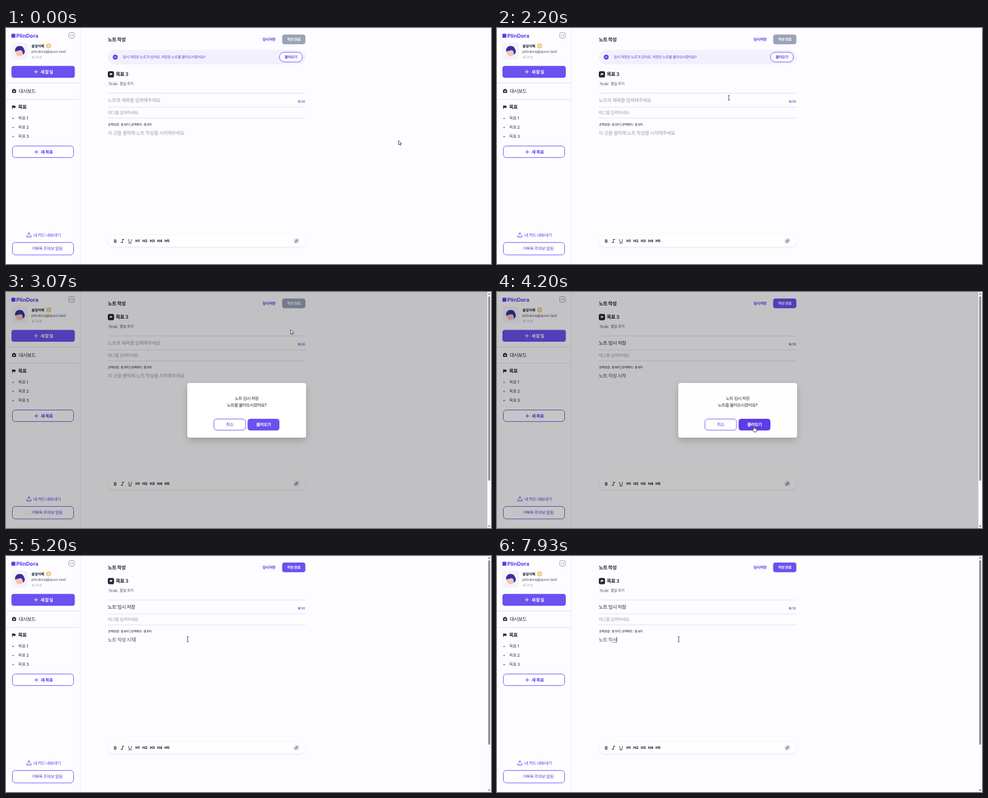
An HTML page that plays this animation: 800x389 px, repeating every 8 s.

```html
<!DOCTYPE html>
<html lang="ko">
<head>
<meta charset="utf-8">
<title>노트 작성</title>
<style>
html, body { margin: 0; width: 100%; height: 100%; overflow: hidden; background: #fdfcff; }
svg { display: block; width: 100vw; height: 100vh; }
text {
  font-family: Inter, "Noto Sans CJK KR", "Noto Sans CJK", sans-serif;
  letter-spacing: -.06em; white-space: pre; text-rendering: geometricPrecision;
}
.latin { letter-spacing: 0; }
</style>
</head>
<body>
<svg id="stage" viewBox="0 0 800 389"></svg>
<script>
const LOOP = 8000;
const PURPLE = '#6c50f0', DEEP = '#5a3de8', INK = '#1e2433', SLATE = '#475063', MUTED = '#98a1b3', RULE = '#e3e4ec';
const SHIFT = -35;               // the banner's height, lost once it is dismissed
const OPEN = 2790, SAVED = 4190, CLOSE = 4195, FADE = 150;

const text = (x, y, size, str, fill = INK, weight = 400, extra = '') =>
  `<text x="${x}" y="${y}" font-size="${size}" fill="${fill}" font-weight="${weight}" ${extra}>${str}</text>`;
const rect = (x, y, w, h, rx, fill, extra = '') =>
  `<rect x="${x}" y="${y}" width="${w}" height="${h}" rx="${rx}" fill="${fill}" ${extra}/>`;
const outlined = (x, y, w, h, rx) => rect(x, y, w, h, rx, '#fff', `stroke="${PURPLE}" stroke-width=".9"`);
const line = (d, color, width = 1, extra = '') =>
  `<path d="${d}" fill="none" stroke="${color}" stroke-width="${width}" ${extra}/>`;
const shape = (d, fill, extra = '') => `<path d="${d}" fill="${fill}" ${extra}/>`;
const circle = (x, y, r, fill, extra = '') => `<circle cx="${x}" cy="${y}" r="${r}" fill="${fill}" ${extra}/>`;
const plus = (x, y, color) => line(`M${x - 3.2} ${y}h6.4M${x} ${y - 3.2}v6.4`, color, .9);
const flag = (x, y, s, fill) =>
  shape('M-2.6-3h.8v.4q1.400-.5 2.500 0t2.200 0v3.500q-1.100.5-2.200 0t-2.500 0v2.300h-.8z', fill,
    `transform="translate(${x} ${y}) scale(${s})"`);
const CENTER = 'text-anchor="middle"';

const sidebar = () => [
  line('M122.500 0V389', '#ebebf2'),
  rect(9, 9.500, 6.500, 6.500, .8, DEEP),
  text(17, 16, 8.8, 'PlinDora', DEEP, 700, 'class="latin"'),
  rect(103.500, 7.500, 9.300, 9.300, 2.600, '#fff', 'stroke="#8a91a3" stroke-width=".8"'),
  line('M107.800 10.200l-1.900 1.900 1.900 1.900M110.800 10.200l-1.900 1.900 1.900 1.900', '#6c7385', .7),
  rect(9, 24, 27, 28, 4, '#f5f4fb'),
  circle(22.500, 40, 6.600, '#f5c3bb'),
  shape('M14.800 39Q14.500 29.500 23 29.500Q30.500 30 31 40Q29.500 44 27.800 43.500Q28 38.500 25 36.500Q19 37 14.800 39z', '#382f9f'),
  text(42, 31.500, 6, '솔잎식혜', INK, 600),
  circle(70.300, 29.500, 4, '#edc277'),
  circle(70.300, 29.500, 2.400, '#f6dfa8'),
  text(42, 40.700, 6.200, 'plindora@quvo.test', SLATE, 400, 'class="latin"'),
  text(42, 49.700, 5, '로그아웃', MUTED),
  rect(9, 62.500, 104.500, 19.500, 4, PURPLE),
  plus(49.300, 72.200, '#fff'),
  text(57, 74.800, 7, '새 할 일', '#fff', 700),
  line('M0 90.500H122M0 117.500H122', RULE),
  rect(10, 101.500, 6.600, 5.600, 1.400, INK),
  rect(11.700, 100.400, 3.200, 2, .8, INK),
  circle(13.300, 104.200, 1.300, '#fff'),
  text(21, 106.800, 8, '대시보드', INK, 500),
  flag(12.700, 130.500, 1, INK),
  text(20, 133.300, 8, '목표', INK, 600),
  ...[1, 2, 3].map(n => {
    const y = 136.300 + 15 * n;
    return circle(11.700, y - 2.300, 1, SLATE) + text(20, y, 7, '목표 ' + n, SLATE, 500);
  }),
  outlined(10.500, 194.500, 101, 19, 5),
  plus(50, 204.300, DEEP),
  text(57.300, 206.800, 7.200, '새 목표', DEEP, 600),
  line('M34.300 341.500v3h7v-3M37.800 342.500v-4.800M35.700 339.500l2.100-2.100 2.100 2.100', DEEP, .9),
  text(45, 344, 7, '내 카드 내보내기', DEEP, 500),
  outlined(10.500, 353.500, 101, 20.500, 5),
  circle(33.300, 363.800, 3.800, '#fff', 'stroke="#e9e8f3" stroke-width=".6"'),
  text(42, 366.300, 7, '거북목 주의보 알림', DEEP, 500),
].join('');

const header = () => [
  text(168, 21.600, 8, '노트 작성', INK, 600),
  text(423, 21, 6.200, '임시저장', DEEP, 600),
  rect(455.500, 10.800, 38.300, 15.900, 4, '#9aa2b6', 'id="submit"'),
  text(474.700, 21, 6.100, '작성 완료', '#fff', 600, CENTER),
].join('');

const banner = () => [
  rect(168, 36, 326, 24, 12, '#f3f0fd'),
  circle(180.200, 48, 4, DEEP),
  line('M178.700 46.500l3 3m0-3l-3 3', '#fff', .8),
  text(192.500, 50.200, 6.050, '임시 저장된 노트가 있어요. 저장된 노트를 불러오시겠어요?', DEEP, 500),
  outlined(451, 40, 38, 16, 8),
  text(470, 50.300, 6.100, '불러오기', DEEP, 600, CENTER),
].join('');

const editor = () => [
  rect(168, 71.300, 10.200, 10.200, 2.800, INK),
  flag(173.200, 76.500, .7, '#fff'),
  text(181, 79.400, 8.200, '목표 3', INK, 600),
  rect(168, 88, 17, 8, 2, '#f1f2f8'),
  text(169.600, 94.100, 5.300, 'To do', SLATE, 500, 'class="latin"'),
  text(187.500, 94.300, 6.200, '할일 추가', SLATE, 500),
  line('M168 107.500H494M168 130.500H494M168 148.500H494', RULE),
  text(168, 121.800, 8, '', MUTED, 400, 'id="title"'),
  text(493.500, 123, 5.300, `<tspan id="count"></tspan><tspan fill="${DEEP}">/30</tspan>`, INK, 500, 'class="latin" text-anchor="end"'),
  text(168, 141.500, 7, '태그를 입력하세요.', MUTED),
  text(168, 160.700, 5.200, '', INK, 500, 'id="stats"'),
  text(168, 175.800, 8, '', MUTED, 400, 'id="body"'),
  line('', SLATE, .6, 'id="compose"'),
  line('', INK, .6, 'id="caret"'),
  rect(168, 341.500, 326, 19, 9.500, '#fefeff', 'filter="url(#soft)"'),
  text(180, 353.500, 7.500, 'B', INK, 600, CENTER),
  line('M191.300 348.500h3.600M189.300 353.500h3.600M193.200 348.500l-2.100 5', INK, .9),
  line('M202.300 348v2.800q0 2.200 2.200 2.200t2.200-2.200v-2.800M201.800 354.600h5.400', INK, .8),
  ...[1, 2, 3, 4, 5].map(n => text(204.900 + 12.150 * n, 353.300, 6, 'H' + n, INK, 800, 'class="latin" ' + CENTER)),
  circle(479, 351, 5, '#e4e5ef'),
  `<g transform="translate(479 351) rotate(-45)" fill="none" stroke="${SLATE}" stroke-width=".8">
    <rect x="-3" y="-1.100" width="3.300" height="2.200" rx="1.100"/><rect x="-.3" y="-1.100" width="3.300" height="2.200" rx="1.100"/></g>`,
].join('');

const modal = () => [
  rect(0, 0, 794, 389, 0, '#000', 'opacity=".24"'),
  rect(299, 150, 196, 90, 4, '#fff', 'filter="url(#lift)"'),
  text(397, 178.200, 7, '노트 임시 저장', INK, 500, CENTER),
  text(397, 188.600, 7, '노트를 불러오시겠어요?', INK, 500, CENTER),
  outlined(343, 209.300, 52, 18.500, 4.500),
  text(369, 221.200, 7.200, '취소', DEEP, 500, CENTER),
  rect(398.500, 209, 52.500, 19.200, 4.500, PURPLE, 'id="load"'),
  text(424.800, 221.200, 7, '불러오기', '#fff', 700, CENTER),
].join('');

const scrollbar = () => [
  rect(794, 0, 6, 389, 0, '#fbfbfc'),
  rect(795.500, 7, 3, 304, 1.500, '#85858a'),
  shape('M797 1.500l2 2.800h-4zM797 387.800l2-2.800h-4z', '#707075'),
].join('');

const pointers = {
  arrow: shape('M0 0V7L1.700 5.500L2.800 8L4 7.500L2.900 5.100H5z', '#fff', 'stroke="#222" stroke-width=".7"'),
  ibeam: line('M-1.700-4.200Q0-4.200 0-3.200Q0-4.200 1.700-4.200M0-3.200V3.200M-1.700 4.200Q0 4.200 0 3.200Q0 4.200 1.700 4.200', '#333', .8),
  hand: shape('M-.9.800Q0-.5.9.800V3.300L3.800 4Q4.800 4.300 4.600 5.400L3.800 9.200H-.3L-3 5.800Q-3 4.600-1.900 5L-.9 5.900z',
    '#fff', 'stroke="#222" stroke-width=".8"'),
};

const stage = document.getElementById('stage');
stage.innerHTML = `<defs>
  <filter id="soft" x="-10%" y="-60%" width="120%" height="220%"><feDropShadow dx="0" dy=".8" stdDeviation="1" flood-color="#55557a" flood-opacity=".2"/></filter>
  <filter id="lift" x="-20%" y="-30%" width="140%" height="170%"><feDropShadow dx="0" dy="5" stdDeviation="6" flood-opacity=".18"/></filter>
  </defs>` + rect(0, 0, 800, 389, 0, '#fdfcff') + sidebar() + header() +
  `<g id="banner">${banner()}</g><g id="editor">${editor()}</g><g id="modal">${modal()}</g>
   <g id="scrollbar">${scrollbar()}</g><g id="pointer">` +
  Object.entries(pointers).map(([kind, art]) => `<g data-kind="${kind}">${art}</g>`).join('') + '</g>';

const part = Object.fromEntries([...stage.querySelectorAll('[id]')].map(el => [el.id, el]));
const show = (el, on) => el.setAttribute('visibility', on ? 'visible' : 'hidden');
const clamp = v => Math.min(1, Math.max(0, v));
const ease = v => v * v * (3 - 2 * v);

// time, x, y of the pointer's hot spot
const route = [
  [0, 647.500, 185.500], [120, 647.500, 185.500], [850, 388, 117], [2150, 382.500, 115], [2260, 382.500, 115],
  [2650, 472, 46], [OPEN, 474, 46.300], [2950, 474, 46.300], [3600, 424, 221.500], [4400, 424, 221.500], [4950, 299.700, 137.200],
];
function pointerAt(t) {
  const next = route.findIndex(stop => stop[0] > t);
  if (next < 0) return route.at(-1).slice(1);
  const [t0, x0, y0] = route[next - 1], [t1, x1, y1] = route[next];
  const k = ease((t - t0) / (t1 - t0));
  return [x0 + (x1 - x0) * k, y0 + (y1 - y0) * k];
}

const DRAFT = '노트 작성 시작';
const TYPING = 7100;
const edits = [[5000, DRAFT]];
for (let n = 1; n <= 5; n++) edits.push([6000 + 140 * n, DRAFT.slice(0, DRAFT.length - n)]);
['ㅈ', '자', '작', '작ㅅ', '작서'].forEach((s, i) => edits.push([TYPING + 150 * i, '노트 ' + s]));

const inside = (x, y, left, top, right, bottom) => x >= left && x <= right && y >= top && y <= bottom;

function render(t) {
  const opened = t >= OPEN, saved = t >= SAVED;
  const alpha = clamp((t - OPEN) / FADE) * (1 - clamp((t - CLOSE) / FADE));
  const shift = opened ? SHIFT : 0;

  show(part.banner, !opened);
  show(part.scrollbar, opened);
  part.editor.setAttribute('transform', `translate(0 ${shift})`);
  part.modal.setAttribute('opacity', alpha);
  part.submit.setAttribute('fill', saved ? PURPLE : '#9aa2b6');

  const title = saved ? '노트 임시 저장' : '';
  part.title.textContent = title || '노트의 제목을 입력해주세요';
  part.title.setAttribute('fill', title ? INK : MUTED);
  part.count.textContent = title.length;

  const edit = edits.findLast(e => e[0] <= t);
  const body = edit ? edit[1] : saved ? DRAFT : '';
  part.body.textContent = body || '이 곳을 클릭해 노트 작성을 시작해주세요';
  part.body.setAttribute('fill', body ? SLATE : MUTED);
  part.stats.textContent = `공백포함 : 총 ${body.length}자 | 공백제외 : 총 ${body.replaceAll(' ', '').length}자`;

  const end = 168 + part.body.getComputedTextLength();
  part.caret.setAttribute('d', `M${end + .4} 168.300v8.600`);
  show(part.caret, edit && (t - edit[0]) % 1060 < 530);
  part.compose.setAttribute('d', `M${end - 6.800} 177.500H${end}`);
  show(part.compose, t >= TYPING);

  const [x, y] = pointerAt(t);
  const onLoad = alpha > 0 && inside(x, y, 398, 209, 451, 228);
  const onBanner = !opened && inside(x, y, 451, 40, 489, 56);
  const onText = alpha === 0 && inside(x, y, 168, 108 + shift, 494, 338 + shift);
  const kind = onLoad || onBanner ? 'hand' : onText ? 'ibeam' : 'arrow';
  part.load.setAttribute('fill', onLoad ? '#5834e8' : PURPLE);
  part.pointer.setAttribute('transform', `translate(${x} ${y})`);
  for (const el of part.pointer.children) show(el, el.dataset.kind === kind);
}

const start = performance.now();
function tick() {
  render((performance.now() - start) % LOOP);
  requestAnimationFrame(tick);
}
tick();
</script>
</body>
</html>
```
